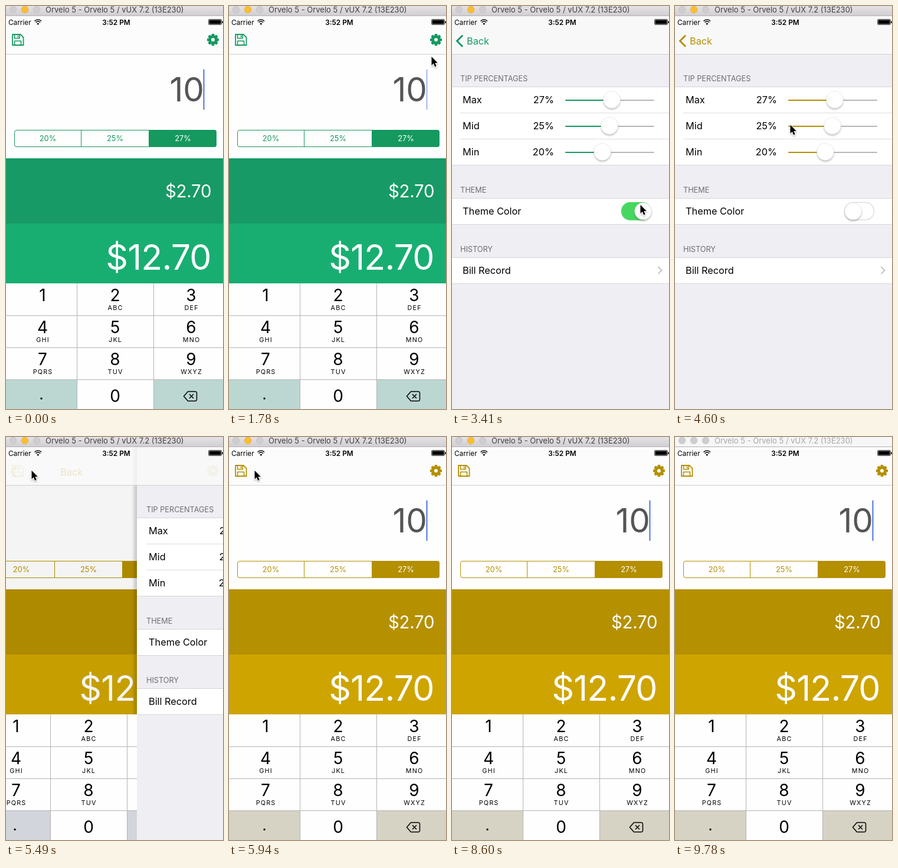
Animation of 368 by 680 pixels, one loop 9880 ms. Source, as an HTML page:

```html
<!DOCTYPE html>
<html lang="en">
<head>
<meta charset="utf-8">
<title>Tip calculator</title>
<style>
  html, body { margin: 0; width: 100%; height: 100%; overflow: hidden; background: #fff; }
  svg { display: block; font-family: Inter, Roboto, sans-serif; }
  svg { --accent: #15995f; --band: #179a65; --total: #18ae72; --key: #bcd7d1; }
  svg.gold { --accent: #b48f00; --band: #b59000; --total: #cea400; --key: #d6d3c5; }
  svg.plain { --key: #d2d5db; }
  .accent { fill: var(--accent); }
  .line { fill: none; stroke: var(--accent); }
  .row { font-size: 16.3px; }
  .head { font-size: 12.7px; fill: #6d6d72; }
  .mid { text-anchor: middle; }
  .end { text-anchor: end; }
  .white { fill: #fff; }
  .lights circle { fill: #cfcdcf; stroke: #bcbabc; stroke-width: .6; }
  .active .lights .amber { fill: #fdbe2e; stroke: #e0a028; }
  #bar { fill: #f6f6f6; }
  #title { fill: #a8a8a8; font-size: 13px; }
  .active #bar { fill: url(#chrome); }
  .active #title { fill: #404040; }
</style>
</head>
<body>
<svg id="stage" width="368" height="680" viewBox="0 0 368 680">
  <defs>
    <linearGradient id="chrome" x2="0" y2="1">
      <stop stop-color="#e4e2e4"/><stop offset="1" stop-color="#d1cfd1"/>
    </linearGradient>
    <linearGradient id="edge">
      <stop stop-opacity="0"/><stop offset="1" stop-opacity=".2"/>
    </linearGradient>
    <filter id="drop" x="-30%" y="-30%" width="160%" height="170%">
      <feDropShadow dx="0" dy="2" stdDeviation="1.5" flood-opacity=".28"/>
    </filter>
  </defs>

  <rect width="368" height="680" fill="#fefefe"/>
  <g id="home"></g>
  <!-- The keyboard is neither dimmed nor shaded by the sliding panel. -->
  <rect id="dim" y="17" width="368" height="451"/>
  <g id="panel"></g>

  <g id="nav">
    <rect y="17" width="368" height="64" fill="#fbfbfb" opacity=".75"/>
    <rect y="81" width="368" height="1" fill="#d0d0d1"/>
    <g id="save" class="line" stroke-width="1.800" stroke-linejoin="round">
      <path d="M11 48h13.500l5 5v13h-18.500z"/>
      <path d="M14.500 48v6.500h8.500v-6.500M14.500 66v-7h11v7" stroke-width="1.600"/>
      <path d="M20.500 49.500v3.500" stroke-width="1.600"/>
    </g>
    <g id="gear" transform="translate(351 57)"></g>
    <path id="chevron" class="line" d="M18 49.500 8.500 59 18 68.500" stroke-width="3"/>
    <text id="back" class="row accent" y="65">Back</text>
  </g>

  <g id="status">
    <text x="4" y="32" font-size="11.800">Carrier</text>
    <path d="M48.500 25.500a8 8 0 0 1 11.500 0M50.500 27.700a5 5 0 0 1 7.500 0" fill="none" stroke="#000" stroke-width="1.500"/>
    <path d="M54.250 32l-2-2.300a3 3 0 0 1 4 0z"/>
    <text class="mid" x="187" y="31.500" font-size="11.800" font-weight="600">3:52 PM</text>
    <rect x="343.500" y="22.500" width="22" height="9" rx="1.500" fill="none" stroke="#000" stroke-width=".7"/>
    <rect x="344.500" y="23.500" width="20" height="7" rx=".5"/>
    <rect x="366.500" y="25.500" width="1.500" height="3.500"/>
  </g>

  <g id="window">
    <rect id="bar" width="368" height="16"/>
    <rect y="16" width="368" height="1" fill="#b4b2b4"/>
    <g class="lights">
      <circle cx="12" cy="6" r="5.800"/><circle class="amber" cx="32" cy="6" r="5.800"/><circle cx="52" cy="6" r="5.800"/>
    </g>
    <text id="title" x="67" y="11">Orvelo 5 - Orvelo 5 / vUX 7.2 (13E230)</text>
  </g>

  <path id="pointer" d="M.5 .5V15L3.800 12 6.200 17.500 8.700 16.500 6.400 11.100H10.900Z" stroke="#fff" stroke-width="1.600" paint-order="stroke" filter="url(#drop)"/>
</svg>

<script>
const LOOP = 9880, WIDTH = 368, HIDDEN = 370;
const $ = id => document.getElementById(id);
const text = (x, y, label, cls = '', more = '') =>
  `<text x="${x}" y="${y}" class="${cls}" ${more}>${label}</text>`;
const rect = (x, y, w, h, fill, more = '') =>
  `<rect x="${x}" y="${y}" width="${w}" height="${h}" fill="${fill}" ${more}/>`;
const thumb = (x, y, id = '') =>
  `<circle ${id} cx="${x}" cy="${y}" r="14.3" fill="#fff" stroke="#d8d8d8" stroke-width=".5" filter="url(#drop)"/>`;

function homeView() {
  const centers = [62, 185, 314];
  const letters = ['', 'ABC', 'DEF', 'GHI', 'JKL', 'MNO', 'PQRS', 'TUV', 'WXYZ'];
  const keys = letters.map((group, i) => {
    const x = centers[i % 3], y = 498 + 54 * Math.floor(i / 3);
    return text(x, y, i + 1, 'mid', 'font-size="28"') +
      text(x + .6, y + 15, group, 'mid', 'font-size="10.8" letter-spacing="1.2"');
  }).join('');
  return rect(14.5, 209.5, 342, 28, 'none', 'rx="3.5" stroke="var(--accent)"') +
    rect(127, 210, 1, 27, 'var(--accent)') +
    '<path class="accent" d="M242 209H353a4 4 0 0 1 4 4V234a4 4 0 0 1-4 4H242Z"/>' +
    text(71, 228, '20%', 'mid accent', 'font-size="12.8"') +
    text(185, 228, '25%', 'mid accent', 'font-size="12.8"') +
    text(300, 228, '27%', 'mid white', 'font-size="12.8"') +
    text(336, 161, '10', 'end', 'font-size="56.5" fill="#555"') +
    rect(334.5, 107, 2, 68, '#4a72d8', 'id="caret"') +
    rect(0, 257, WIDTH, 110, 'var(--band)') +
    rect(0, 367, WIDTH, 101, 'var(--total)') +
    text(348.3, 323, '$2.70', 'end white', 'font-size="29.5" letter-spacing="-.3"') +
    text(347.6, 445, '$12.70', 'end white', 'font-size="59" letter-spacing="-.9"') +
    rect(0, 630, 120, 50, 'var(--key)') + rect(251, 630, 117, 50, 'var(--key)') +
    [522, 576, 630].map(y => rect(0, y, WIDTH, 1, '#b4b4b4')).join('') +
    [120, 250].map(x => rect(x, 468, 1, 212, '#b4b4b4')).join('') +
    keys + text(185, 668, '0', 'mid', 'font-size="28"') +
    text(60, 664, '.', 'mid', 'font-size="26"') +
    `<path d="M308.5 650.5H321a2.5 2.5 0 0 1 2.5 2.5V664a2.5 2.5 0 0 1-2.5 2.5H308.5L301.5 658.5Z
      M311 655l7 7M318 655l-7 7" fill="none" stroke="#000" stroke-width="1.5" stroke-linejoin="round"/>`;
}

function settingsView() {
  const left = -2, span = WIDTH - left;
  const group = (y, h, head) => text(14, y - 9, head, 'head') +
    rect(left, y, span, h, '#fff') +
    rect(left, y, span, 1, '#d6d6da') + rect(left, y + h, span, 1, '#d6d6da');
  const slider = (y, label, value, x) =>
    text(18, y + 6, label, 'row') + text(173, y + 6, value, 'row end') +
    rect(192, y, 151, 2, '#b7b7b7', 'rx="1"') +
    rect(192, y, x - 192, 2, 'var(--accent)', 'rx="1"') + thumb(x, y);
  return rect(left - 9, 17, 9, 451, 'url(#edge)') + rect(left, 17, span, 663, '#eeeef3') +
    group(136, 132, 'TIP PERCENTAGES') + group(324, 44, 'THEME') + group(424, 44, 'HISTORY') +
    rect(14, 180, 354, 1, '#dcdce0') + rect(14, 224, 354, 1, '#dcdce0') +
    slider(158, 'Max', '27%', 271) + slider(202, 'Mid', '25%', 267) + slider(246, 'Min', '20%', 255) +
    text(18, 352, 'Theme Color', 'row') +
    rect(287.5, 331.5, 50, 29.5, '#fff', 'rx="14.7" stroke="#dedede" stroke-width="1.5"') +
    rect(287, 331, 51, 30.5, '#47d760', 'rx="15.2" id="switchFill"') +
    thumb(324, 346.3, 'id="switchThumb"') +
    text(18, 452, 'Bill Record', 'row') +
    '<path d="M349.5 440 355.5 446 349.5 452" fill="none" stroke="#c4c4c9" stroke-width="2"/>';
}

$('home').innerHTML = homeView();
$('panel').innerHTML = settingsView();
$('gear').innerHTML = '<circle class="line" r="5.3" stroke-width="4.6"/>' +
  Array.from({ length: 8 }, (_, i) =>
    `<path class="accent" d="M-2.8-6.5-2.1-10H2.1L2.8-6.5Z" transform="rotate(${i * 45})"/>`).join('');

const start = {
  x: -50, y: 0, caret: 1, off: HIDDEN, on: 1, gear: 1, save: 1, back: 0, theme: '', active: true
};
// Each step changes only the listed parts and holds until the next one.
const at = (x, y) => ({ x, y });
const steps = [
  [290, { caret: .5 }], [440, { caret: 0 }], [740, { caret: .5 }], [890, { caret: 1 }],
  [1180, at(235, 497)],
  [1330, { ...at(258, 420), caret: .5 }],
  [1480, { ...at(290, 290), caret: 0 }],
  [1630, at(322, 160)],
  [1780, { ...at(343, 85), caret: .5 }],
  [1930, { ...at(349, 60), caret: 1 }],
  [2230, { gear: .3, caret: .5 }], [2380, { gear: 1, caret: 0 }],
  [2670, { off: 15, gear: .02, save: 0, back: .35 }],
  [2820, { off: 3, gear: 0, back: .85 }],
  [2970, { off: 0, back: 1, ...at(349, 75) }],
  [3120, at(345, 160)], [3270, at(332, 270)], [3410, at(319, 335)], [3560, at(314, 351)],
  [3850, { on: .5 }], [4000, { on: .1, theme: 'gold' }], [4150, { on: 0 }],
  [4600, at(195, 200)], [4750, at(110, 114)], [4900, at(58, 70)], [5050, at(43, 56)],
  [5340, { off: 40, back: .6, theme: 'gold plain' }],
  [5490, { off: 224, back: .2, save: .08, gear: .06 }],
  [5640, { off: 327, back: .06, save: .6, gear: .6 }],
  [5790, { off: 362, back: 0, save: .9, gear: .9, caret: 1 }],
  [5940, { off: HIDDEN, save: 1, gear: 1, theme: 'gold' }],
  [6090, { caret: .5 }], [6240, { caret: 0 }],
  [6530, { caret: .5 }],
  [6680, { ...at(70, 85), caret: 1 }],
  [6830, at(120, 170)], [6970, at(180, 270)],
  [7120, { ...at(235, 340), caret: .5 }],
  [7270, { ...at(275, 380), caret: 0 }],
  [7410, { ...at(292, 394), caret: .5 }],
  [7560, { ...at(294, 396), caret: 1 }],
  [8010, { caret: .5 }], [8160, { caret: 0 }],
  [8450, { ...at(283, 460), caret: .5 }],
  [8600, { x: -50, caret: 1 }],
  [9040, { caret: .5 }], [9190, { caret: 0 }], [9490, { caret: .5 }], [9640, { caret: 1 }],
  [9780, { active: false }]
];

const set = (id, name, value) => $(id).setAttribute(name, value);

function render(time) {
  const s = Object.assign({}, start, ...steps.filter(([t]) => t <= time).map(([, change]) => change));
  const shown = 1 - s.off / HIDDEN;
  set('stage', 'class', `${s.theme} ${s.active ? 'active' : ''}`);
  set('pointer', 'transform', `translate(${s.x} ${s.y})`);
  set('home', 'transform', `translate(${Math.round(-113 * shown)} 0)`);
  set('panel', 'transform', `translate(${s.off} 0)`);
  set('panel', 'visibility', shown ? 'visible' : 'hidden');
  set('dim', 'opacity', .1 * shown);
  set('back', 'x', 25 + .3 * s.off);
  set('back', 'opacity', s.back);
  set('chevron', 'opacity', s.off > 100 ? s.back / 3 : s.back);
  set('caret', 'opacity', s.caret);
  set('gear', 'opacity', s.gear);
  set('save', 'opacity', s.save);
  set('switchFill', 'opacity', s.on);
  set('switchThumb', 'cx', 302 + 22 * s.on);
}

const begin = performance.now();
function tick() {
  render((performance.now() - begin) % LOOP);
  requestAnimationFrame(tick);
}
tick();
</script>
</body>
</html>
```
